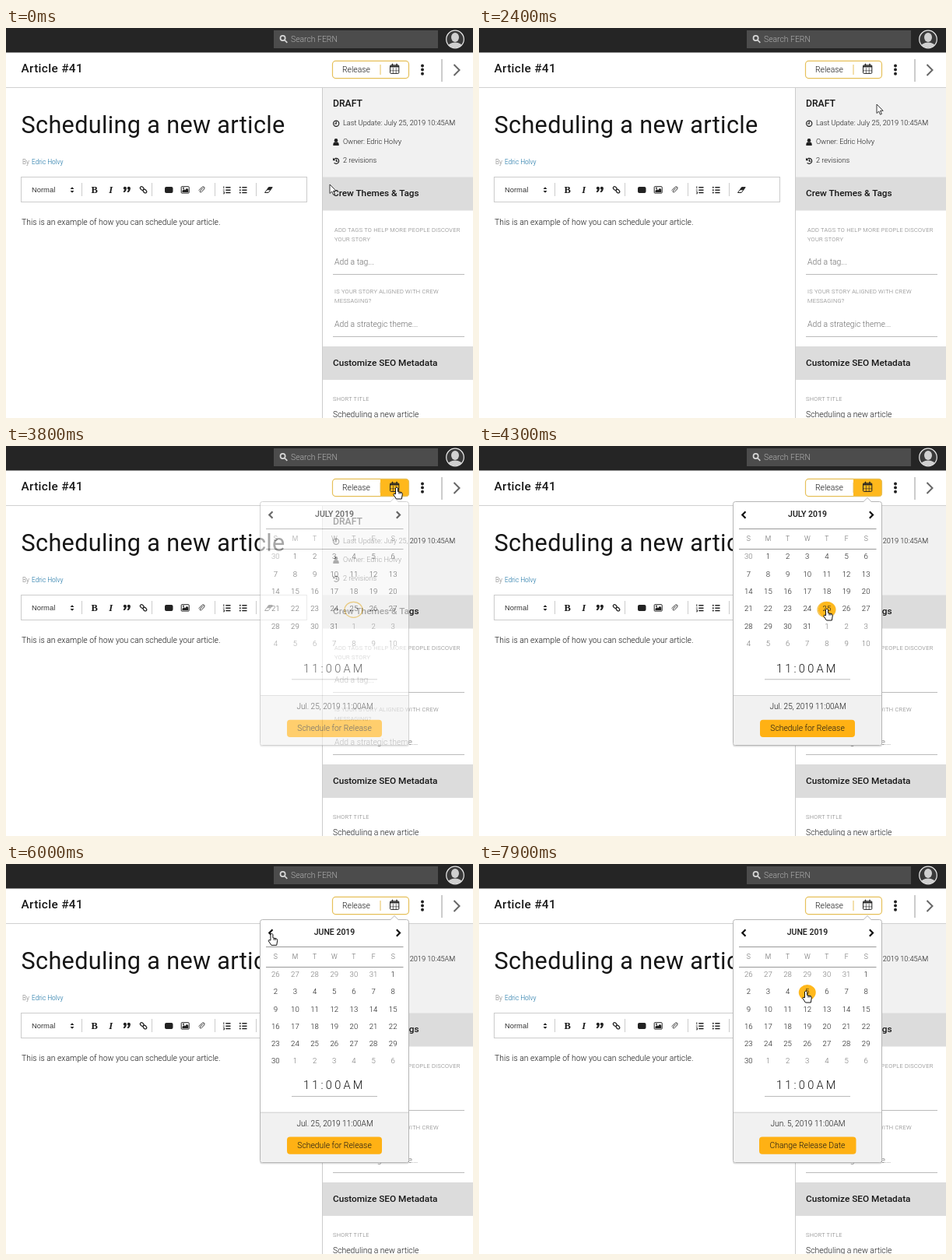
Write an HTML page that moves like this. It is 600 by 501 pixels and loops after 8 s.

```html
<!DOCTYPE html>
<html lang="en">
<head>
<meta charset="utf-8">
<title>Scheduling an article</title>
<style>
html, body { margin: 0; width: 100%; height: 100%; overflow: hidden; background: #fff; }
svg { display: block; width: 100vw; height: 100vh; }
text { font: 300 10.4px Roboto, sans-serif; fill: #161616; white-space: pre; transform: translateY(-.5px); }
.info { font-size: 9.2px; }
.heading { font-size: 11.8px; font-weight: 500; }
.label { font-size: 7.4px; letter-spacing: .28px; fill: #777; }
.hint { font-size: 10.4px; fill: #6c6c6c; }
.mid { text-anchor: middle; }
.line { fill: none; stroke: #222; }
.rule { fill: none; stroke: #bbb; }
.day { font-size: 9.6px; text-anchor: middle; }
.weekday { font-size: 8.6px; text-anchor: middle; fill: #666; }
.other { fill: #777; }
.icon { fill: #222; }
.accent { fill: #ffb81c; }
</style>
</head>
<body>
<svg viewBox="0 0 600 501">
  <rect width="600" height="501" fill="#fff"/>

  <!-- top bar -->
  <rect width="600" height="31.5" fill="#252525"/>
  <rect x="344" y="3" width="211" height="23" fill="#4c4c4c"/>
  <g fill="none" stroke="#d8d8d8" stroke-width="1.7"><circle cx="355.6" cy="13" r="3.1"/><path d="M358 15.5L361.3 18.8"/></g>
  <text x="366" y="18" style="fill:#b0b0b0">Search FERN</text>
  <clipPath id="face"><circle cx="577" cy="14.5" r="11"/></clipPath>
  <circle cx="577" cy="14.5" r="11.3" fill="#3a3a3a" stroke="#e8e8e8" stroke-width="1.2"/>
  <g clip-path="url(#face)" fill="#d0d0d0"><ellipse cx="577" cy="12" rx="5" ry="6"/><ellipse cx="577" cy="25" rx="10" ry="6.5"/></g>

  <!-- title row -->
  <text x="19.5" y="57.7" style="font-size:15.3px;font-weight:500;letter-spacing:.35px">Article #41</text>
  <path class="rule" d="M0 76.5H600" style="stroke:#d0d0d0"/>
  <path class="accent" id="releaseFill" d="M480 43V65H424Q420 65 420 61V47Q420 43 424 43Z"/>
  <path class="accent" id="calendarFill" d="M481 42.5H514Q518 42.5 518 47V60.5Q518 65 514 65H481Z"/>
  <rect x="419.5" y="42.4" width="98" height="22.2" rx="4" fill="none" stroke="#e6c05a" stroke-width="1.2"/>
  <path d="M481 47V60" stroke="#e6c05a"/>
  <text x="432" y="57">Release</text>
  <g class="line">
    <rect x="493.5" y="47.8" width="11.3" height="10.6" rx="1"/>
    <path d="M493.5 49.4H505" stroke-width="2"/>
    <path d="M496.5 45.8V48.6M502 45.8V48.6" stroke-width="1.4"/>
    <path d="M493.5 54.8H505M497.4 51V58.5M501.2 51V58.5" stroke-width=".6"/>
  </g>
  <g class="icon"><circle cx="535" cy="48.4" r="2"/><circle cx="535" cy="53.6" r="2"/><circle cx="535" cy="58.8" r="2"/></g>
  <path class="rule" d="M560 40V69" style="stroke:#999"/>
  <path d="M575.5 47L582.5 54L575.5 61" fill="none" stroke="#666" stroke-width="2"/>

  <!-- article -->
  <text x="19.5" y="135.3" style="font-size:30.6px;font-weight:400;letter-spacing:.35px">Scheduling a new article</text>
  <text x="21" y="175" style="font-size:8.2px;fill:#777">By</text>
  <text x="33" y="175" style="font-size:8.3px;fill:#0b6a9f">Edric Holvy</text>
  <rect class="rule" x="19.5" y="191.5" width="367" height="32" style="stroke:#ccc"/>
  <path class="rule" d="M97.5 199V216M187.5 199V216M268.5 199V216M321.5 199V216" style="stroke:#ccc"/>
  <text x="33" y="211.5" style="font:9.4px 'Liberation Sans',sans-serif;fill:#333">Normal</text>
  <path class="icon" d="M82.5 207L85 204.2L87.5 207ZM82.5 209L85 211.8L87.5 209Z"/>
  <text x="109.5" y="212.5" style="font:700 12.5px 'Liberation Serif',serif">B</text>
  <text x="132.3" y="212.5" style="font:italic 700 12.5px 'Liberation Serif',serif">I</text>
  <g id="quote" class="icon"><circle cx="152.8" cy="205.7" r="2"/><path d="M154.8 205.5Q154.8 210.5 151 211.3V209.6Q152.8 209 152.8 206Z"/></g>
  <use href="#quote" x="5"/>
  <g class="line" stroke-width="1.3">
    <rect x="-2.6" y="-1.8" width="5.2" height="3.6" rx="1.8" transform="translate(174.7 206) rotate(45)"/>
    <rect x="-2.6" y="-1.8" width="5.2" height="3.6" rx="1.8" transform="translate(178.4 209.6) rotate(45)"/>
  </g>
  <rect class="icon" x="204" y="204" width="10.5" height="8" rx="2"/>
  <rect class="line" x="225.2" y="203.7" width="10" height="8.4" rx=".8"/>
  <path class="icon" d="M226.5 211V209L228.6 207L230 208.3L232.4 205.7L234.2 207.5V211Z"/><circle class="icon" cx="228" cy="205.8" r="1"/>
  <path class="line" d="M253 205.5L249.5 209.2Q248.7 210.5 249.7 211Q250.5 211.2 251.3 210.4L254.5 207Q255.7 205 254.2 204Q252.7 203.4 251.3 205L247.7 208.7" stroke-width=".9"/>
  <g class="line" stroke-width="1.5"><path id="bars" d="M282.3 204.8H288.5M282.3 208.2H288.5M282.3 211.6H288.5"/><use href="#bars" x="21"/></g>
  <path class="line" d="M279.8 203.3V206.2M278.8 208.2H280.8M279 210.5H280.5V212.8H279" stroke-width=".9"/>
  <g class="icon"><circle cx="300.8" cy="204.8" r="1"/><circle cx="300.8" cy="208.2" r="1"/><circle cx="300.8" cy="211.6" r="1"/></g>
  <path class="line" d="M332.5 211.5L337.5 204.7H342.2L337.2 211.5Z"/><path class="icon" d="M334.8 208.2L337.5 204.5H342.3L339.5 208.2Z"/>
  <text x="20" y="253.7">This is an example of how you can schedule your article.</text>

  <!-- sidebar -->
  <rect x="407" y="77" width="193" height="115" fill="#f1f1f1"/>
  <path fill="#dcdcdc" d="M407 191.5H600V234.5H407ZM407 409H600V452H407Z"/>
  <path class="rule" d="M406.5 77V501" style="stroke:#ccc"/>
  <text class="heading" x="420" y="101.3" style="font-size:12.2px">DRAFT</text>
  <g class="line" stroke-width="1.2">
    <circle cx="424.2" cy="122.7" r="3.6"/><path d="M424.2 120.2V123H422"/>
    <path d="M421.2 169A3.5 3.5 0 1 1 421.6 173.2M424.4 168.4V171.2H426.3"/>
  </g>
  <path class="icon" d="M420 166.8L423.3 170.2H420Z"/>
  <circle class="icon" cx="424" cy="144.4" r="2.3"/><path class="icon" d="M420.3 151Q420 146.8 422.4 146.5H425.6Q428 146.8 427.7 151Z"/>
  <text class="info" x="433" y="125.5">Last Update: July 25, 2019 10:45AM</text>
  <text class="info" x="433" y="149.5">Owner: Edric Holvy</text>
  <text class="info" x="433" y="173.8">2 revisions</text>
  <text class="heading" x="420" y="216.3">Crew Themes &amp; Tags</text>
  <text class="label" x="422" y="262">ADD TAGS TO HELP MORE PEOPLE DISCOVER</text>
  <text class="label" x="422" y="274.3">YOUR STORY</text>
  <text class="hint" x="422" y="304.3">Add a tag...</text>
  <text class="label" x="422" y="341.3">IS YOUR STORY ALIGNED WITH CREW</text>
  <text class="label" x="422" y="353.7">MESSAGING?</text>
  <text class="hint" x="422" y="384">Add a strategic theme...</text>
  <path class="rule" d="M420 316.5H589M420 396.5H589"/>
  <text class="heading" x="420" y="434.5">Customize SEO Metadata</text>
  <text class="label" x="420" y="479.8">SHORT TITLE</text>
  <text x="420" y="500.3">Scheduling a new article</text>

  <!-- date picker -->
  <g id="popup">
    <rect id="shadow" x="326" y="73" width="192" height="313.5" rx="3" fill="#000" opacity=".12"/>
    <rect id="panel" x="326.5" y="71.5" width="191" height="313" rx="3" fill="#fff" stroke="#b5b5b5"/>
    <path d="M493.5 72L499 66.5L504.5 72" fill="#fff" stroke="#b5b5b5"/>
    <path d="M342.5 84.3L338.3 88.5L342.5 92.7M501.8 84.3L506 88.5L501.8 92.7" fill="none" stroke="#111" stroke-width="2.2"/>
    <text class="mid" id="month" x="422" y="91.7" style="font-size:10.5px;font-weight:500"></text>
    <path d="M334 106.5H510.5M334 132.5H510.5" stroke="#999"/>
    <g id="weekdays"></g>
    <ellipse id="today" cx="446.5" cy="210.3" rx="11.5" ry="10" fill="none" stroke="#f0c04c" stroke-width="1.3"/>
    <ellipse id="dayFill" class="accent" rx="11" ry="10"/>
    <g id="days"></g>
    <g id="lower">
      <text x="382" y="291" style="font-size:14.6px;letter-spacing:3.2px">11:00AM</text>
      <path class="rule" d="M367 299.8H477"/>
      <path d="M327 320H517V382Q517 384 515 384H329Q327 384 327 382Z" fill="#f1f1f1"/>
      <path class="rule" d="M327 320.5H517" style="stroke:#d0d0d0"/>
      <text class="mid" id="date" x="422.5" y="338.9" style="font-size:10.1px"></text>
      <rect id="action" y="351.7" height="22.3" rx="4" fill="#ffb114"/>
      <text class="mid" id="actionText" x="422" y="366.5"></text>
    </g>
  </g>

  <g id="cursor">
    <path id="arrow" d="M0 0V11.5L2.7 9L4.5 13.2L6.4 12.4L4.6 8.3H8.2Z" fill="#fff" stroke="#222" stroke-width=".9"/>
    <path id="hand" d="M-1.5 1Q0 -1 1.5 1V5.5L6 6.6Q7.4 7 7.3 9L6.3 15H-.5L-4.2 9.5Q-4.3 7.2 -1.5 8.8ZM3 6V8.5M5 6.5V8.5" fill="#fff" stroke="#111"/>
    <path id="beam" d="M-2.5 -5.5H2.5M0 -5.5V5.5M-2.5 5.5H2.5" fill="none" stroke="#222" stroke-width="1.1"/>
  </g>
</svg>
<script>
const LOOP = 8000, STEP = 100;
const $ = id => document.getElementById(id);
const show = (id, on) => { $(id).style.display = on ? '' : 'none'; };
const columnX = c => 346.3 + c * 25.15;
const months = {
  july: { title: 'JULY 2019', lead: 1, length: 31, previous: 30, row: 22.4 },
  june: { title: 'JUNE 2019', lead: 6, length: 30, previous: 31, row: 22.2 }
};

// Cursor path: time, x, y
const path = [
  [300, 416, 201], [700, 506, 145], [1200, 43, 50], [1300, 47, 52], [1600, 150, 157],
  [2000, 525, 112], [2400, 511, 98], [2700, 450, 55], [3000, 502, 53], [4000, 502, 53],
  [4300, 447, 209], [4700, 432, 358], [4900, 430, 355], [5300, 348, 101], [5500, 340, 88],
  [5900, 340, 88], [6700, 373, 119], [6900, 340, 95], [7200, 428, 348], [7600, 420, 163]
];

function cursorAt(t) {
  const next = path.findIndex(p => p[0] > t);
  if (next === 0) return path[0].slice(1);
  if (next < 0) return path[path.length - 1].slice(1);
  const [t0, x0, y0] = path[next - 1], [t1, x1, y1] = path[next];
  const u = (t - t0) / (t1 - t0), e = u * u * (3 - 2 * u);
  return [x0 + (x1 - x0) * e, y0 + (y1 - y0) * e];
}

$('weekdays').innerHTML = [...'SMTWTFS'].map((d, c) =>
  `<text class="weekday" x="${columnX(c)}" y="122">${d}</text>`).join('');

let shownMonth;
function showMonth(month) {
  if (month === shownMonth) return;
  shownMonth = month;
  $('month').textContent = month.title;
  $('days').innerHTML = Array.from({ length: 42 }, (_, i) => {
    const n = i - month.lead + 1;
    const inside = n > 0 && n <= month.length;
    const label = n < 1 ? n + month.previous : inside ? n : n - month.length;
    const y = 145.6 + Math.floor(i / 7) * month.row;
    return `<text class="day${inside ? '' : ' other'}" x="${columnX(i % 7)}" y="${y}">${label}</text>`;
  }).join('');
}

function render(now) {
  const t = Math.floor(now % LOOP / STEP) * STEP;
  const [x, y] = cursorAt(t);
  const within = (left, top, w, h) => x >= left && x <= left + w && y >= top && y <= top + h;
  const open = t > 3600;
  const month = t < 5900 ? months.july : months.june;
  const changed = t >= 7600;
  showMonth(month);

  const overRelease = within(420, 43, 60, 22);
  const overCalendar = within(481, 43, 37, 22);
  show('releaseFill', overRelease);
  show('calendarFill', overCalendar || open && t < 5700);

  const fade = Math.min(1, Math.max(0, (t - 3600) / 400));
  $('popup').setAttribute('opacity', 1 - (1 - fade) ** 1.4);
  show('popup', open);

  const col = Math.round((x - 346.3) / 25.15), row = Math.round((y - 142) / month.row);
  const cell = row * 7 + col - month.lead + 1;
  const dayX = columnX(col), dayY = 142.5 + row * month.row;
  const overDay = open && col >= 0 && col < 7 && row >= 0 && row < 6 &&
    cell > 0 && cell <= month.length && Math.hypot(x - dayX, y - dayY) < 10;
  show('dayFill', overDay);
  $('dayFill').setAttribute('cx', dayX);
  $('dayFill').setAttribute('cy', dayY + .4);
  show('today', month === months.july);

  const shift = month === months.july ? 0 : -1.3;
  $('lower').setAttribute('transform', `translate(0 ${shift})`);
  $('panel').setAttribute('height', 313 + Math.round(shift));
  $('shadow').setAttribute('height', 313.5 + Math.round(shift));
  $('date').textContent = changed ? 'Jun. 5, 2019 11:00AM' : 'Jul. 25, 2019 11:00AM';
  $('actionText').textContent = changed ? 'Change Release Date' : 'Schedule for Release';
  $('action').setAttribute('x', changed ? 360 : 361);
  $('action').setAttribute('width', changed ? 124.5 : 122);

  const overControl = open && (within(334, 82, 12, 13) || within(361, 350, 122, 23));
  const overText = within(20, 44, 80, 15) || within(20, 108, open ? 300 : 338, 30) ||
    open && within(340, 114, 162, 10) && Math.abs(x - columnX(col)) < 7;
  const kind = overRelease || overCalendar || overDay || overControl ? 'hand' : overText ? 'beam' : 'arrow';
  for (const id of ['arrow', 'hand', 'beam']) show(id, id === kind);
  $('cursor').setAttribute('transform', `translate(${x} ${y})`);
}

const start = performance.now();
function tick() {
  render(performance.now() - start);
  requestAnimationFrame(tick);
}
tick();
</script>
</body>
</html>
```
